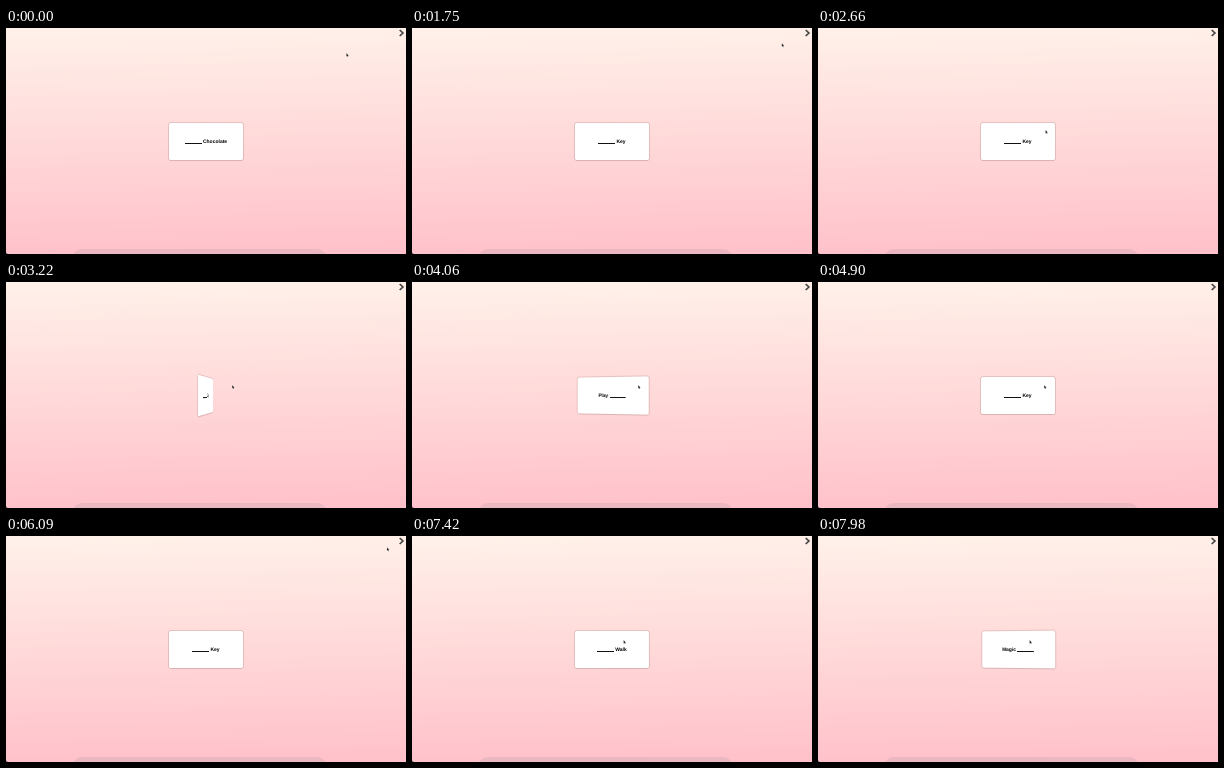
An HTML page for the animation above (8 s loop, 400 by 226 pixels).

```html
<!DOCTYPE html>
<html lang="en">
<head>
<meta charset="utf-8">
<title>Flash cards</title>
<style>
  html, body { margin: 0; width: 100%; height: 100%; overflow: hidden; background: #222; }
  #stage {
    position: relative; width: 400px; height: 226px; overflow: hidden;
    border-radius: 0 0 0 2px;
    background: linear-gradient(179deg, #fff1e9, #ffd9d9 50%, #ffc0ca);
  }
  #dock {
    position: absolute; left: 66px; top: 221px; width: 255px; height: 20px;
    border-radius: 10px; background: #ebb8c1; filter: blur(.5px);
  }
  #card {
    position: absolute; left: 163px; top: 95px; width: 74px; height: 37px;
    border-radius: 1.5px; background: #fff;
    box-shadow: 0 0 0 .5px rgba(120, 70, 70, .35), 0 .3px 1px rgba(0, 0, 0, .2);
    font: bold 5px/38px "Liberation Sans", Arial, sans-serif;
    text-align: center; white-space: pre; color: #000;
    text-rendering: geometricPrecision;
  }
  #card i {
    display: inline-block; width: 16.7px; vertical-align: -1px;
    border-bottom: 1px solid #111;
  }
  svg { position: absolute; left: 0; top: 0; }
</style>
</head>
<body>
<div id="stage">
  <div id="dock"></div>
  <div id="card"></div>
  <svg width="400" height="226">
    <path d="M393.7 2 L396.9 5 L393.7 8" fill="none" stroke="#444" stroke-width="1.7"/>
    <path id="cursor" d="M0 0 V3.6 L.8 2.9 L1.3 4.1 L1.9 3.8 L1.4 2.7 H2.4 Z"
          fill="#000" stroke="#fff" stroke-width=".25"/>
  </svg>
</div>
<script>
const LOOP = 8000, FLIP = 800, PERSPECTIVE = 312;
const BLANK = "<i></i>";
const card = document.getElementById("card");
const cursor = document.getElementById("cursor");

const cards = [
  { shown: 0, front: BLANK + " Chocolate", back: "Hot " + BLANK },
  { shown: 1400, front: BLANK + " Key", back: "Play " + BLANK },
  { shown: 6510, front: BLANK + " Walk", back: "Magic " + BLANK },
];
const flipTimes = [3010, 3982, 7411];
const nextArrow = [394.5, 2];

const clamp = v => Math.min(1, Math.max(0, v));
const smooth = v => v * v * (3 - 2 * v);

// The CSS "ease" curve, cubic-bezier(.25, .1, .25, 1)
function ease(x) {
  if (x === 0 || x === 1) return x;
  let lo = 0, hi = 1;
  for (let i = 0; i < 20; i++) {
    const s = (lo + hi) / 2;
    if (.75 * s * (1 - s) + s ** 3 < x) lo = s; else hi = s;
  }
  return .3 * lo * (1 - lo) ** 2 + 3 * lo * lo * (1 - lo) + lo ** 3;
}

function pointerAt(t) {
  let pos = [340.4, 25];
  const glide = (from, to, target) => {
    const k = smooth(clamp((t - from) / (to - from)));
    pos = pos.map((v, i) => v + (target[i] - v) * k);
  };
  glide(20, 700, nextArrow);
  glide(1670, 1960, [262, 73]);
  glide(2120, 2730, [226.2, 103]);
  glide(4990, 5320, [311.5, 59]);
  glide(5480, 6300, nextArrow);
  glide(6750, 7000, [211.6, 104]);
  return pos;
}

// Every click turns the card the other way
const angleAt = t => flipTimes.reduce(
  (sum, start, i) => sum + 180 * (-1) ** i * ease(clamp((t - start) / FLIP)), 0);

function draw(now) {
  const t = now % LOOP;
  const { front, back } = cards.findLast(c => c.shown <= t);
  const angle = angleAt(t), flipped = angle > 90;
  card.innerHTML = flipped ? back : front;
  card.style.transform =
    `perspective(${PERSPECTIVE}px) rotateY(${flipped ? angle - 180 : angle}deg)`;
  cursor.setAttribute("transform", `translate(${pointerAt(t)})`);
}

let origin;
function frame(now) {
  origin ??= now;
  draw(now - origin);
  requestAnimationFrame(frame);
}
draw(0);
requestAnimationFrame(frame);
</script>
</body>
</html>
```
